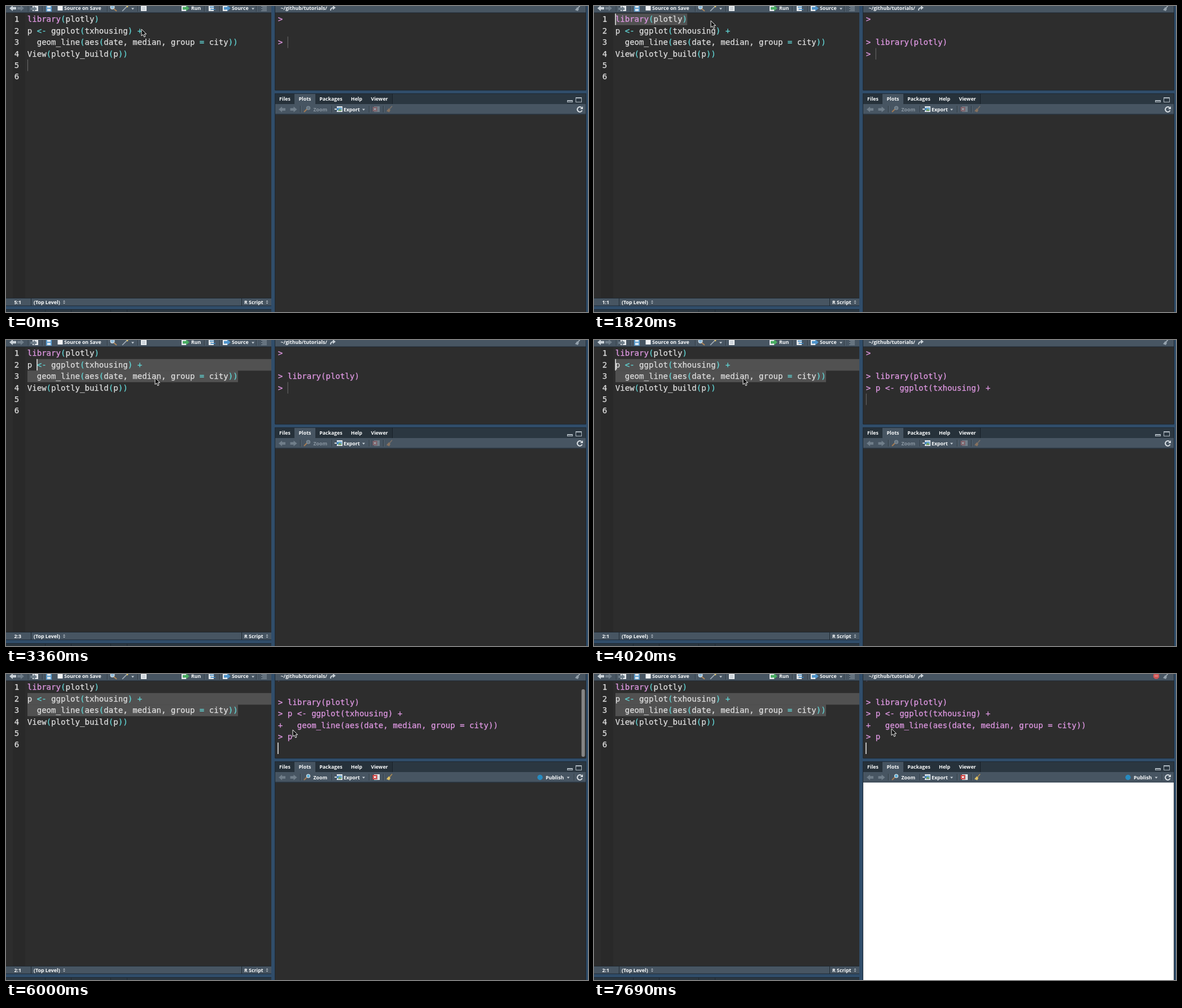
These frames come from a looping animation (1031 by 543 pixels, 8 s). An HTML page with a canvas:

```html
<!DOCTYPE html>
<html lang="en">
<head>
<meta charset="utf-8">
<title>Editor session</title>
<style>
html, body { margin: 0; width: 100%; height: 100%; overflow: hidden; background: #2d2d2d; }
canvas { display: block; }
</style>
</head>
<body>
<canvas id="stage" width="1031" height="543"></canvas>
<script>
const ctx = document.getElementById('stage').getContext('2d');
const LOOP = 8000, CHAR = 8.477, ROW = 20.4, TOP = 13.4;
const CODE_FONT = '14.08px "DejaVu Sans Mono", monospace';
const UI_FONT = '700 8.8px "Open Sans", sans-serif';
const C = {
  bg: '#2d2d2d', gutter: '#292929', text: '#dedede', plum: '#df98e2', cyan: '#62d6d6',
  select: '#515151', bar: '#475562', tabs: '#2b3741', split: '#304d6a', edge: '#1f2932',
  dim: '#8a96a1', white: '#f8fafb', icon: '#c9d1d8', faint: '#707e8a'
};
const SOURCE = [
  'library(plotly)',
  'p <- ggplot(txhousing) +',
  '  geom_line(aes(date, median, group = city))',
  'View(plotly_build(p))'
];

// Each track is a list of [start time, value]; values hold until the next start.
const POINTER = [
  [0, [240, 41]], [140, [222, 33]], [350, [207, 26]],
  [2120, [214, 31]], [2275, [230, 43]], [2430, [248, 56]], [2585, [264, 67]],
  [4200, [345, 78]], [4350, [450, 92]], [4500, [508, 99]],
  [6870, [518, 98]], [7060, [527, 97]]
];
const EDIT_POS = [
  [0, [5, 1]], [860, [1, 16]], [1460, [1, 1]], [2740, [3, 28]],
  [3040, [3, 45]], [3360, [2, 3]], [3690, [2, 1]]
];
const SELECTION_END = [[0, null], [1460, [1, 16]], [2740, null], [3360, [3, 45]]];
const EDIT_CARET = [[0, 'idle'], [860, 'on'], [4830, 'off']];
const CONSOLE_CARET = [[0, 'idle'], [4500, 'on'], [6680, 'off'], [7250, 'on'], [7550, 'off'], [7690, 'on']];
const RUN1 = '> ' + SOURCE[0], RUN2 = '> ' + SOURCE[1], RUN3 = '+ ' + SOURCE[2];
const LOG = [
  [0, ['>', '', '> ']],
  [1640, ['>', '', RUN1, '']],
  [1820, ['>', '', RUN1, '> ']],
  [4020, ['>', '', RUN1, RUN2, '']],
  [4200, ['>', '', RUN1, RUN2, RUN3, '> ']],
  [5220, ['>', '', RUN1, RUN2, RUN3, '> p']],
  [5820, ['>', '', RUN1, RUN2, RUN3, '> p', '']]
];

function at(track, t) {
  let value = track[0][1];
  for (const [start, v] of track) if (t >= start) value = v;
  return value;
}
function rect(x, y, w, h, color) {
  ctx.fillStyle = color;
  ctx.fillRect(x, y, w, h);
}
function shape(points, color) {
  ctx.fillStyle = color;
  ctx.beginPath();
  points.forEach(([x, y]) => ctx.lineTo(x, y));
  ctx.closePath();
  ctx.fill();
}
function line(x1, y1, x2, y2, color, width = 1) {
  ctx.strokeStyle = color;
  ctx.lineWidth = width;
  ctx.beginPath();
  ctx.moveTo(x1, y1);
  ctx.lineTo(x2, y2);
  ctx.stroke();
}
function disc(x, y, r, color) {
  ctx.fillStyle = color;
  ctx.beginPath();
  ctx.arc(x, y, r, 0, 7);
  ctx.fill();
}
function label(text, x, y, color = C.white, align = 'left') {
  ctx.font = UI_FONT;
  ctx.textAlign = align;
  ctx.fillStyle = color;
  ctx.fillText(text, x, y);
}
function code(text, x, y, color) {
  ctx.font = CODE_FONT;
  ctx.textAlign = 'left';
  ctx.fillStyle = ctx.strokeStyle = color;
  ctx.lineWidth = 0.25;
  ctx.fillText(text, x, y);
  ctx.strokeText(text, x, y);
}
function caret(x, y, state) {
  if (state === 'on') rect(x - 0.7, y, 1.6, ROW, '#e2e2e2');
  if (state === 'idle') rect(x, y, 1, ROW, '#6c6c6c');
}
function divider(x, y, h) {
  rect(x, y, 1, h, '#2c3740');
  rect(x + 1, y, 1, h, '#5a6874');
}
function dropMark(x, y, color = C.icon) {
  shape([[x - 2.5, y - 1.5], [x + 2.5, y - 1.5], [x, y + 1.5]], color);
}
// dir: 1 points right, -1 points left
function arrow(x, y, dir, color) {
  const p = [[6, 0], [0, -5], [0, -2.3], [-6, -2.3], [-6, 2.3], [0, 2.3], [0, 5]];
  shape(p.map(([a, b]) => [x + a * dir, y + b]), color);
}
function page(x, y, w, h) {
  rect(x, y, w, h, '#e9edf0');
  for (let i = 2; i < h - 1; i += 2) rect(x + 2, y + i, w - 4, 0.8, '#a3b0bb');
}
function lens(x, y, color, rim) {
  line(x - 6, y + 5, x - 1, y, '#a67b52', 2);
  disc(x + 1.5, y - 2, 3.6, rim);
  disc(x + 1.5, y - 2, 2.5, color);
}
function broom(x, y, handle, brush) {
  line(x + 5, y - 6, x, y, handle, 1.6);
  shape([[x - 1, y - 2], [x + 2, y + 1], [x, y + 5], [x - 5, y + 3]], brush);
}

function editorToolbar() {
  rect(0, 0, 470, 12, C.bar);
  rect(0, 11.5, 470, 1, C.edge);
  arrow(12, 4, -1, C.icon);
  arrow(26, 4, 1, C.faint);
  [39, 64, 179, 233, 351, 378, 443].forEach(x => divider(x, 0, 10));
  page(47, 0, 10, 9);
  arrow(49, 5, 1, '#6d7c88');
  rect(71, 0, 10, 10, '#5c9ed0');
  rect(73, 0, 6, 3, '#e4ebf0');
  rect(73, 5, 6, 4, '#dce6ee');
  rect(91.5, 0, 9, 8, '#f0f2f4');
  label('Source on Save', 103, 7.3);
  disc(188.5, 2, 4, '#d4dde4');
  disc(188.5, 2, 2.7, '#8fbcdb');
  line(191, 5, 196, 9, '#b58a5b', 2);
  line(206, 9, 215, 0, '#a7b2bb', 1.6);
  disc(215, 1, 1.4, '#e0c36a');
  dropMark(224.5, 5);
  page(239, 0, 10, 9);
  page(311, 0, 8, 9);
  arrow(319, 4, 1, '#48ad62');
  label('Run', 328, 7.3);
  page(359, 0, 9, 9);
  line(361, 2, 369, 2, '#3987c4', 1.5);
  line(363, 6, 371, 6, '#3987c4', 1.5);
  page(384, 0, 8, 9);
  arrow(392, 4, 1, '#4d93cb');
  label('Source', 400, 7.3);
  dropMark(437.5, 5);
  for (let y = 0; y < 9; y += 2) rect(452 + y % 4, y, 10 - y % 4, 1, '#85929d');
}

function statusBar(pos) {
  rect(0, 518, 470, 14, C.bar);
  rect(0, 518, 470, 1, C.edge);
  rect(0, 531.5, 470, 1, C.edge);
  rect(44, 519, 1, 13, C.edge);
  rect(417, 519, 1, 13, C.edge);
  label(pos.join(':'), 20.8, 529, C.white, 'center');
  label('(Top Level)', 49, 529);
  label('R Script', 422, 529);
  for (const x of [103, 462.5]) {
    shape([[x - 2, 524.5], [x + 2, 524.5], [x, 522.5]], C.icon);
    shape([[x - 2, 526.5], [x + 2, 526.5], [x, 528.5]], C.icon);
  }
  rect(0, 538, 470, 5, C.tabs);
  rect(0, 538, 470, 1, C.edge);
  [69, 115, 185, 214].forEach(x => rect(x, 539, 1, 4, C.edge));
}

function drawSelection([l1, c1], [l2, c2]) {
  for (let l = l1; l <= l2; l++) {
    const from = l === l1 ? 38 + (c1 - 1) * CHAR : 38;
    const to = l === l2 ? 38 + (c2 - 1) * CHAR : 470;
    rect(from, TOP + (l - 1) * ROW, to - from, ROW + 0.2, C.select);
  }
}

function editor(t) {
  const pos = at(EDIT_POS, t), end = at(SELECTION_END, t);
  rect(0, 12, 470, 506, C.bg);
  rect(12, 12.5, 22, 505.5, C.gutter);
  if (end) drawSelection(pos, end);
  for (let i = 0; i < 6; i++) code(String(i + 1), 14.8, TOP + i * ROW + 15, C.text);
  SOURCE.forEach((src, i) => {
    let x = 37.7;
    for (const part of src.split(/(library|<-|[()+=])/)) {
      const color = part === 'library' ? C.plum : /^(<-|[()+=])$/.test(part) ? C.cyan : C.text;
      code(part, x, TOP + i * ROW + 15, color);
      x += part.length * CHAR;
    }
  });
  caret(38 + (pos[1] - 1) * CHAR, TOP + (pos[0] - 1) * ROW, at(EDIT_CARET, t));
  editorToolbar();
  statusBar(pos);
}

function consolePane(t) {
  const rows = at(LOG, t), shift = t >= 5820 ? 14.2 : 0;
  rect(477, 12, 550, 137, C.bg);
  ctx.save();
  ctx.beginPath();
  ctx.rect(477, 12.5, 550, 136.5);
  ctx.clip();
  rows.forEach((row, i) => code(row, 481.8, TOP + i * ROW + 15 - shift, C.plum));
  const last = rows.length - 1;
  caret(481.8 + rows[last].length * CHAR, TOP + last * ROW - shift, at(CONSOLE_CARET, t));
  ctx.restore();
  if (t >= 5820 && t < 6410) {
    ctx.fillStyle = '#858585';
    ctx.beginPath();
    ctx.roundRect(1019.5, 27, 6, 120, 3);
    ctx.fill();
  }
  rect(477, 0, 550, 12, C.bar);
  rect(477, 11.5, 550, 1, C.edge);
  rect(477, 149, 550, 1, C.edge);
  label('~/github/tutorials/', 486.5, 7.3);
  ctx.strokeStyle = C.icon;
  ctx.lineWidth = 2;
  ctx.beginPath();
  ctx.moveTo(575, 8);
  ctx.quadraticCurveTo(575, 3, 580, 3);
  ctx.stroke();
  shape([[579, -1], [584, 3], [579, 7]], C.icon);
  if (t >= 6680) {
    const oct = Array.from({ length: 8 }, (_, i) => {
      const a = (i + 0.5) * Math.PI / 4;
      return [996 + 5.6 * Math.cos(a), 3.5 + 5.6 * Math.sin(a)];
    });
    shape(oct, '#cf5555');
    rect(993, 2.5, 6, 2, '#e58b8b');
  }
  broom(1013, 4, '#a8b3bc', '#94a1ac');
}

function plotPane(t) {
  const ready = t >= 6000;
  rect(477, 155, 550, 20, C.tabs);
  rect(477, 155, 550, 1, C.edge);
  const tabs = [['Files', 477, 511], ['Plots', 511, 548], ['Packages', 548, 603], ['Help', 603, 639], ['Viewer', 639, 684]];
  for (const [name, x, right] of tabs) {
    rect(x, 156, right - x, 19, name === 'Plots' ? C.bar : '#26313a');
    rect(right, 156, 1, 19, '#192129');
    label(name, (x + right) / 2, 168, C.white, 'center');
  }
  rect(477, 174, 550, 18, C.bar);
  rect(511.5, 173, 36.5, 2, C.bar);
  rect(477, 191.5, 550, 1, C.edge);
  rect(994, 167, 10, 4, '#b0bac2');
  rect(995, 169, 8, 1, C.tabs);
  rect(1009, 162, 11, 9, '#b0bac2');
  rect(1010, 164, 9, 6, C.tabs);

  arrow(489, 183.5, -1, C.faint);
  arrow(509.5, 183.5, 1, C.faint);
  [521, 577, 643, 668].forEach(x => divider(x, 177, 12));
  lens(534, 183, ready ? '#58add6' : '#687783', ready ? '#e0e7ec' : '#84919c');
  label('Zoom', 544.5, 186.7, ready ? C.white : C.dim);
  page(586, 178, 10, 10);
  rect(588, 180, 7, 5, '#73a9d0');
  shape([[588, 186], [591, 182], [595, 186]], '#6c9f55');
  line(582, 183, 587, 183, C.white, 1.6);
  shape([[586, 180], [590, 183], [586, 186]], '#3f7fb7');
  label('Export', 598, 186.7);
  dropMark(633.5, 184);

  if (ready) page(652, 178, 10, 10);
  else rect(652, 178, 10, 10, '#727f8a');
  rect(649.5, 179, 8, 8, ready ? '#c93737' : '#7c5c64');
  const cross = ready ? '#fff' : '#9ba5ad';
  line(651.5, 181, 655.5, 185, cross, 1.2);
  line(655.5, 181, 651.5, 185, cross, 1.2);
  if (ready) broom(679, 183.5, '#b18d51', '#dfc266');
  else broom(679, 183.5, '#7a7068', '#87725f');

  if (ready) {
    disc(946, 183.5, 4.7, '#278bc0');
    label('Publish', 956, 186.7);
    dropMark(996, 184);
    divider(1006, 177, 12);
  }
  ctx.strokeStyle = '#dbe1e6';
  ctx.lineWidth = 2;
  ctx.beginPath();
  ctx.arc(1016.5, 183.5, 4.4, 0.4, 5.5);
  ctx.stroke();
  shape([[1022, 178], [1022, 183], [1017, 183]], '#dbe1e6');

  rect(477, 192.5, 550, 350.5, t >= 6200 ? '#fff' : C.bg);
}

function pointer([x, y]) {
  const body = [[0, 0], [0, 12], [2.8, 9.5], [4.8, 14], [6.9, 13], [5, 8.8], [8.7, 8.8]];
  ctx.save();
  ctx.translate(x, y);
  shape(body, '#111');
  ctx.strokeStyle = '#f2f2f2';
  ctx.lineWidth = 1;
  ctx.stroke();
  ctx.restore();
}

function draw(t) {
  rect(0, 0, 1031, 543, C.split);
  editor(t);
  for (const x of [476, 1027]) {
    rect(x, 0, 1, 149.5, C.edge);
    rect(x, 155, 1, 388, C.edge);
  }
  consolePane(t);
  plotPane(t);
  pointer(at(POINTER, t));
}

const begin = performance.now();
function frame() {
  draw((performance.now() - begin) % LOOP);
  requestAnimationFrame(frame);
}
frame();
</script>
</body>
</html>
```
